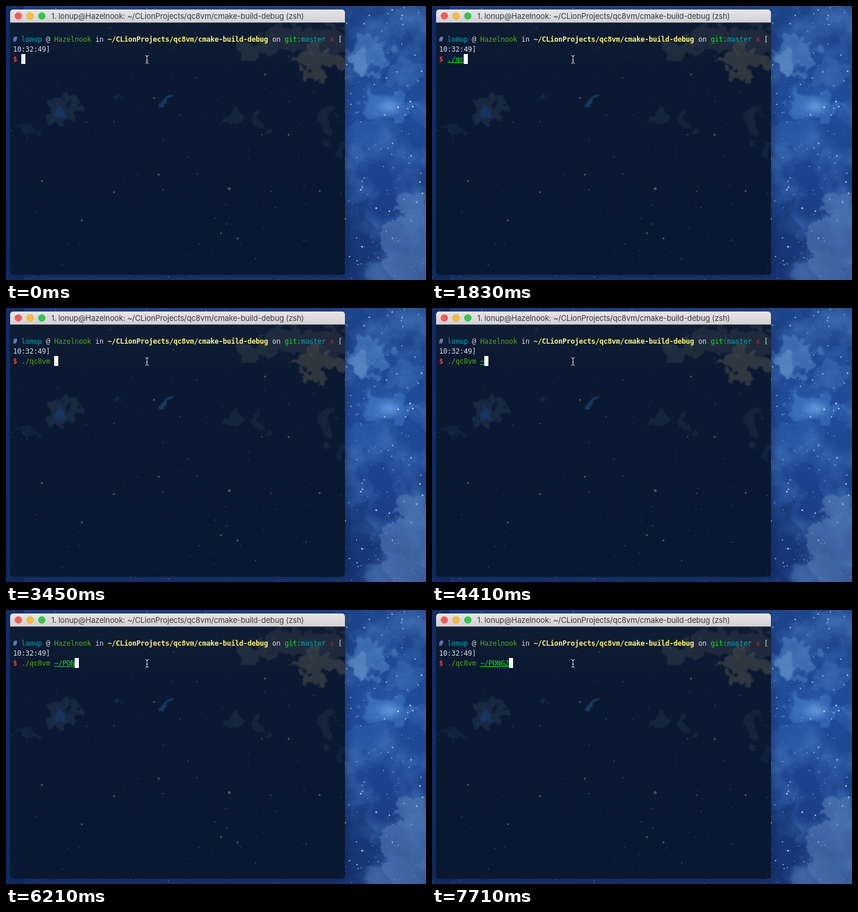
An HTML page that plays this animation: 715x468 px, repeating every 8 s.

```html
<!DOCTYPE html>
<html lang="en">
<head>
<meta charset="utf-8">
<title>Terminal typing</title>
<style>
  html, body { margin: 0; width: 100%; height: 100%; overflow: hidden; background: #173674; }
  svg { position: absolute; left: 0; top: 0; display: block; }
  .term { font: 12px "DejaVu Sans Mono", monospace; letter-spacing: -.224px; white-space: pre; fill: #dcdfe0; }
  .title { font: 13px Inter, "Open Sans", sans-serif; letter-spacing: -.13px; fill: #3b3b3b; }
  .bold { font-weight: bold; }
  .blue { fill: #7398dc; }
  .cyan { fill: #08a5b3; }
  .green { fill: #55a80c; }
  .lime { fill: #0bea18; }
  .yellow { fill: #fff36b; }
  .red { fill: #b92525; }
  .prompt { fill: #f43b36; }
</style>
</head>
<body>
<svg id="scene" width="715" height="468" viewBox="0 0 715 468">
  <defs>
    <linearGradient id="sky" x2="0" y2="1">
      <stop offset="0" stop-color="#1c4388"/>
      <stop offset=".35" stop-color="#204c98"/>
      <stop offset=".7" stop-color="#1a4189"/>
      <stop offset="1" stop-color="#183675"/>
    </linearGradient>
    <linearGradient id="bar" x2="0" y2="1">
      <stop offset="0" stop-color="#e8e6e8"/>
      <stop offset="1" stop-color="#d2d0d2"/>
    </linearGradient>
    <linearGradient id="pane" x2="0" y2="1">
      <stop offset="0" stop-color="#101e35"/>
      <stop offset=".22" stop-color="#0a1831"/>
      <stop offset="1" stop-color="#091831"/>
    </linearGradient>
    <filter id="ragged" x="-40%" y="-40%" width="180%" height="180%" color-interpolation-filters="sRGB">
      <feTurbulence type="fractalNoise" baseFrequency=".035" numOctaves="4" seed="8"/>
      <feDisplacementMap in="SourceGraphic" scale="58" xChannelSelector="R" yChannelSelector="G"/>
      <feGaussianBlur stdDeviation="1.3"/>
    </filter>
    <filter id="haze" x="0" y="0" width="1" height="1" color-interpolation-filters="sRGB">
      <feTurbulence type="fractalNoise" baseFrequency=".018" numOctaves="5" seed="21"/>
      <feColorMatrix values="0 0 0 0 .34  0 0 0 0 .55  0 0 0 0 .82  1.9 0 0 0 -.75"/>
    </filter>
    <filter id="glow" x="-60%" y="-60%" width="220%" height="220%"><feGaussianBlur stdDeviation="7"/></filter>
    <filter id="shadow" x="-10%" y="-10%" width="120%" height="125%"><feGaussianBlur stdDeviation="8"/></filter>
    <clipPath id="frame"><rect x="7" y="6" width="570" height="453" rx="5"/></clipPath>
  </defs>

  <rect width="715" height="468" fill="url(#sky)"/>
  <rect x="0" width="30" height="468" fill="#102a63" opacity=".7"/>
  <rect x="560" width="155" height="468" filter="url(#haze)" opacity=".6"/>
  <g id="skyClouds" filter="url(#ragged)"></g>
  <ellipse cx="654" cy="172" rx="17" ry="7" fill="#80b5f0" opacity=".75" filter="url(#glow)"/>
  <g id="skyStars"></g>

  <rect x="7" y="12" width="570" height="450" rx="5" fill="#061331" opacity=".55" filter="url(#shadow)"/>
  <g clip-path="url(#frame)">
    <rect x="7" y="6" width="570" height="453" fill="url(#pane)"/>
    <g id="paneClouds" filter="url(#ragged)"></g>
    <g id="paneStars"></g>
    <rect x="7" y="6" width="570" height="22" fill="url(#bar)"/>
    <path d="M7 28.5H577" stroke="#848488" opacity=".5"/>
  </g>
  <g stroke-width=".7">
    <circle cx="21" cy="17" r="5.8" fill="#fc5b56" stroke="#df4340"/>
    <circle cx="41" cy="17" r="5.8" fill="#fdbc32" stroke="#dea023"/>
    <circle cx="61" cy="17" r="5.8" fill="#34c84a" stroke="#25aa35"/>
  </g>
  <text class="title" x="77" y="22">1. lonup@Hazelnook: ~/CLionProjects/qc8vm/cmake-build-debug (zsh)</text>

  <text class="term" x="12" y="61"><tspan class="blue bold">#</tspan> <tspan class="cyan">lonup</tspan> @ <tspan class="green">Hazelnook</tspan> in <tspan class="yellow bold">~/CLionProjects/qc8vm/cmake-build-debug</tspan> on <tspan class="lime">git:</tspan><tspan class="cyan">master</tspan> <tspan class="red">x</tspan> [</text>
  <text class="term" x="12" y="78">10:32:49]</text>
  <text class="term" x="12" y="95"><tspan class="prompt bold">$</tspan></text>
</svg>

<svg id="input" width="715" height="468" viewBox="0 0 715 468">
  <g class="term">
    <text id="command" x="26" y="95"></text>
    <text id="argument" class="lime" x="82" y="95"></text>
  </g>
  <rect id="commandLine" class="lime" x="26" y="96" height="1"/>
  <rect id="argumentLine" class="lime" x="82" y="96" height="1"/>
  <rect id="cursor" y="82" width="7" height="17"/>
  <g fill="none">
    <path id="beam" d="M237 84.5Q240 84.5 240 87V95.5Q240 98 237 98M243 84.5Q240 84.5 240 87M240 95.5Q240 98 243 98M238.5 92.5H241.5" stroke="#071021" stroke-width="2.6"/>
    <path d="M237 84.5Q240 84.5 240 87V95.5Q240 98 237 98M243 84.5Q240 84.5 240 87M240 95.5Q240 98 243 98M238.5 92.5H241.5" stroke="#eef1f4"/>
  </g>
</svg>

<script>
const LOOP = 8000;
const CELL = 7;
const LINE = "./qc8vm ~/PONG2";
const COMMAND_LENGTH = 7;
const KEY_TIMES = [60, 480, 1170, 1830, 2490, 2970, 3270, 3450, 4410, 4830, 5310, 5850, 6210, 6870, 7710];
const byId = id => document.getElementById(id);

function seeded(seed) {
  return () => (seed = (seed * 16807) % 2147483647) / 2147483647;
}

function add(parent, tag, attrs) {
  const node = document.createElementNS("http://www.w3.org/2000/svg", tag);
  for (const key in attrs) node.setAttribute(key, attrs[key]);
  parent.append(node);
}

function cloud(parent, cx, cy, rx, ry, fill, opacity) {
  add(parent, "ellipse", { cx, cy, rx, ry, fill, opacity });
}

function scatter(parent, count, box, colors, size, seed) {
  const random = seeded(seed);
  const [x, y, width, height] = box;
  for (let i = 0; i < count; i++) {
    add(parent, "circle", {
      cx: (x + random() * width).toFixed(1),
      cy: (y + random() * height).toFixed(1),
      r: (.35 + size * random() ** 4).toFixed(2),
      fill: colors[Math.floor(random() * colors.length)],
      opacity: (.25 + .65 * random()).toFixed(2)
    });
  }
}

function drawSky() {
  const clouds = byId("skyClouds");
  cloud(clouds, 612, 84, 38, 34, "#5688c8", .5);
  cloud(clouds, 603, 100, 23, 20, "#79a5d8", .38);
  cloud(clouds, 680, 118, 34, 25, "#4a7bc0", .3);
  cloud(clouds, 648, 172, 45, 21, "#4f87d3", .42);
  cloud(clouds, 612, 222, 34, 30, "#3568b1", .42);
  cloud(clouds, 694, 408, 50, 88, "#577eb8", .55);
  cloud(clouds, 655, 462, 38, 38, "#466da9", .42);
  cloud(clouds, 594, 400, 28, 68, "#14336f", .4);
  const stars = byId("skyStars");
  scatter(stars, 390, [574, 0, 141, 468], ["#fff", "#dcecff", "#a8ccf5"], 1.25, 71);
  scatter(stars, 35, [0, 0, 575, 6], ["#8caee0", "#c5dbf5"], .6, 38);
  scatter(stars, 35, [0, 459, 575, 9], ["#7095cc", "#c5dbf5"], .6, 95);
}

function drawPane() {
  const clouds = byId("paneClouds");
  cloud(clouds, 518, 54, 80, 24, "#39424a", .43);
  cloud(clouds, 529, 96, 46, 22, "#555650", .5);
  cloud(clouds, 425, 73, 30, 17, "#35404a", .5);
  cloud(clouds, 91, 177, 28, 22, "#273b51", .5);
  cloud(clouds, 95, 181, 14, 8, "#173b70", .65);
  cloud(clouds, 183, 155, 10, 5, "#183758", .5);
  cloud(clouds, 270, 163, 12, 4, "#1f507c", .65);
  cloud(clouds, 383, 190, 17, 13, "#243748", .45);
  cloud(clouds, 427, 199, 13, 20, "#243748", .38);
  cloud(clouds, 545, 202, 17, 25, "#23364a", .4);
  cloud(clouds, 30, 215, 22, 9, "#1b304a", .45);
  cloud(clouds, 565, 248, 14, 14, "#1c304a", .4);
  const stars = byId("paneStars");
  scatter(stars, 570, [7, 29, 570, 430], ["#34485a", "#4a5a66", "#60706f"], .8, 417);
  const bright = [[441, 117], [252, 157], [61, 299], [184, 318], [380, 312], [534, 316],
    [260, 288], [394, 397], [366, 388], [129, 366], [481, 220]];
  bright.forEach(([cx, cy], i) => add(stars, "circle",
    { cx, cy, r: i === 4 ? 2.5 : 1.7, fill: "#5c6c71", opacity: .75 }));
}

let shown = -1;

function update(time) {
  const count = KEY_TIMES.filter(key => key <= time).length;
  if (count === shown) return;
  shown = count;
  const command = LINE.slice(0, Math.min(count, COMMAND_LENGTH));
  const argument = LINE.slice(COMMAND_LENGTH + 1, Math.max(count, COMMAND_LENGTH + 1));
  const partial = count > 1 && count < COMMAND_LENGTH;
  byId("command").textContent = command;
  byId("command").setAttribute("class", partial ? "lime" : "green");
  byId("argument").textContent = argument;
  byId("commandLine").setAttribute("width", partial ? count * CELL : 0);
  byId("argumentLine").setAttribute("width", argument.length * CELL);
  byId("cursor").setAttribute("x", 26 + count * CELL);
  byId("cursor").setAttribute("fill", count ? "#fff" : "#ebebeb");
}

drawSky();
drawPane();
update(0);
const start = performance.now();

function tick() {
  update((performance.now() - start) % LOOP);
  requestAnimationFrame(tick);
}
requestAnimationFrame(tick);
</script>
</body>
</html>
```
